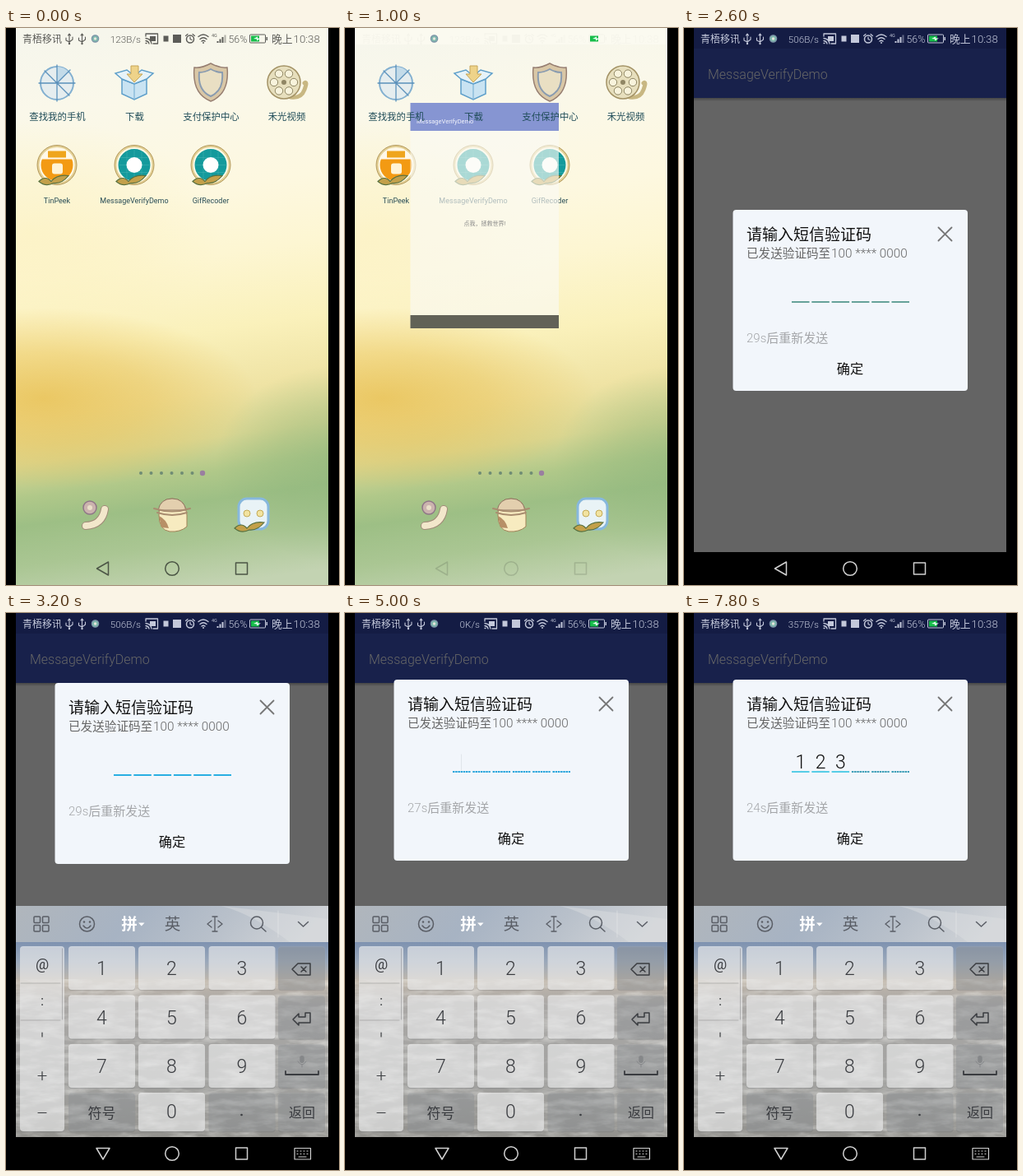
These frames come from a looping animation (405x677 px, 8 s). An HTML page:

```html
<!DOCTYPE html>
<html lang="zh-CN">
<head>
<meta charset="utf-8">
<title>MessageVerifyDemo</title>
<style>
html, body { margin: 0; width: 100%; height: 100%; overflow: hidden; background: #000; }
svg { display: block; width: 100vw; height: 100vh; }
text { font-family: Roboto, "Noto Sans CJK SC", "Noto Sans CJK", sans-serif; white-space: pre; }
.thin { font-weight: 300; }
.line { fill: none; stroke-linecap: round; stroke-linejoin: round; }
.slot { stroke-linecap: butt; }
</style>
</head>
<body>
<svg id="stage" viewBox="0 0 405 677" preserveAspectRatio="none"></svg>
<script>
const LOOP = 8000, TICK = 200;

// Drawing helpers
const rect = (x, y, w, h, fill, r = 0, more = '') =>
  `<rect x="${x}" y="${y}" width="${w}" height="${h}" rx="${r}" fill="${fill}" ${more}/>`;
const circle = (x, y, r, fill, more = '') => `<circle cx="${x}" cy="${y}" r="${r}" fill="${fill}" ${more}/>`;
const line = (d, width = 1.5, color = 'currentColor', more = '') =>
  `<path class="line" d="${d}" stroke-width="${width}" stroke="${color}" ${more}/>`;
const shape = (d, fill, more = '') => `<path d="${d}" fill="${fill}" ${more}/>`;
const text = (x, y, s, size, fill, more = '') =>
  `<text x="${x}" y="${y}" font-size="${size}" fill="${fill}" ${more}>${s}</text>`;
const outline = (color, width = 1.5) => `stroke="${color}" stroke-width="${width}"`;
const ring = outline('currentColor');
const mid = 'text-anchor="middle"';
const thin = 'class="thin"';
const at = (x, y, body) => `<g transform="translate(${x} ${y})">${body}</g>`;
const group = (id, body, more = '') => `<g id="${id}" ${more}>${body}</g>`;
const stops = list => list.map(([o, c, a = 1]) => `<stop offset="${o}" stop-color="${c}" stop-opacity="${a}"/>`).join('');
const glow = (id, x, y, rx, ry, color, alpha) =>
  `<radialGradient id="${id}" gradientUnits="userSpaceOnUse" r="1" gradientTransform="translate(${x} ${y}) scale(${rx} ${ry})" cx="0" cy="0">${stops([[0, color, alpha], [.5, color, alpha * .6], [1, color, 0]])}</radialGradient>`;

const defs = `<defs>
  <linearGradient id="wall" gradientUnits="userSpaceOnUse" x1="155" y1="0" x2="250" y2="677">${stops([
    [0, '#f6f6ec'], [.12, '#faf8ea'], [.3, '#fdf8e0'], [.42, '#fdf6d2'], [.55, '#faf1bb'], [.66, '#efe3a4'],
    [.74, '#d9d794'], [.8, '#b0c889'], [.85, '#9dbf85'], [.92, '#aac693'], [1, '#c3d3b2']])}</linearGradient>
  ${glow('sun', 45, 450, 260, 110, '#e8bd4c', .75)}${glow('grass', 405, 530, 150, 120, '#8fb67c', .6)}
  ${glow('haze1', 30, 250, 230, 140, '#fbefb4', .5)}
  <linearGradient id="sky" x1="0" y1="0" x2="0" y2="1">${stops([
    [0, '#7e92b0'], [.1, '#9aa8ba'], [.2, '#c0b7ab'], [.32, '#a9a7a5'], [.7, '#a3a3a1'], [1, '#92918d']])}</linearGradient>
  <linearGradient id="band" x1="0" y1="0" x2="1" y2=".1">${stops([
    [0, '#b0b6bc'], [.4, '#a7b3c3'], [.7, '#b8c0ca'], [1, '#d0d3d7']])}</linearGradient>
  <linearGradient id="shade" x1="0" y1="0" x2="0" y2="1">${stops([[0, '#000', .3], [1, '#000', 0]])}</linearGradient>
  <filter id="clouds" x="0" y="0" width="1" height="1">
    <feTurbulence type="fractalNoise" baseFrequency=".03 .11" numOctaves="4" seed="4"/>
    <feColorMatrix values="0 0 0 0 1  0 0 0 0 1  0 0 0 0 .97  2.4 0 0 0 -.95"/>
  </filter>
</defs>`;

// Home screen icons, each centred on 0,0
const leaves = shape('M-22 20Q-14 12-7 20Q0 11 14 13Q6 23-4 22Q-14 27-22 20Z', '#c3a04a', outline('#58703f', 1.2));
const badge = (fill, inner) => circle(0, 0, 24, '#e3cf94', outline('#b3995c', 1)) +
  circle(0, 0, 20.5, fill, outline('#fffbe8', 2)) + inner + leaves;
const grid = line('M-16-9H16M-18 0H18M-16 9H16M-9-16V16M0-18V18M9-16V16', .6, '#4fb9b9', 'opacity=".7"');
const icons = {
  finder: circle(0, 1, 20, '#e5edef', outline('#83b0d0', 2)) + shape('M0 1V-19A20 20 0 0 1 14-13Z', '#c3dbe9') +
    line('M-22 1H22M0-21V23M-15-14L15 16M0 1L16-15', 1.3, '#5b91bb'),
  box: shape('M-15-4L0 2 15-4V14L0 21-15 14Z', '#c9e3f2', outline('#5e9fca')) +
    shape('M-15-4L-23-11-9-15 0-8 9-15 23-11 15-4 0 2Z', '#e7f3f8', outline('#5e9fca')) +
    line('M0 2V21', 1.2, '#7db3d5') + shape('M-4-20H5V-10H10L0 0-9-10H-4Z', '#eed38a', outline('#c6a559', 1)),
  shield: shape('M-20-18Q-11-17 0-23Q11-17 20-18Q23 14 0 23Q-23 14-20-18Z', '#d9c7a6', outline('#977f72')) +
    shape('M-14-12Q-7-12 0-16Q7-12 14-12Q16 10 0 17Q-16 10-14-12Z', '#e9dfc3', outline('#8a9cb0', 2)),
  reel: line('M5 18Q18 20 22 9T22 1', 5, '#c8b782') + circle(-3, 0, 20, '#e7dfbd', outline('#a39265')) +
    [0, 1, 2, 3, 4, 5].map(i => circle(-3 + 12 * Math.cos(i * 1.047), 12 * Math.sin(i * 1.047), 4.7, '#f8f3dc', outline('#8e8562', 1))).join('') +
    circle(-3, 0, 3, '#908664'),
  tag: badge('#f39a13', shape('M-19-7A20 20 0 0 1 19-7Z', '#fff8e8') + rect(-11, -17, 22, 8, '#efa51d') + rect(-6, -2, 13, 13, '#fff3d5', 3)),
  robot: badge('#149a9c', grid + circle(0, 0, 9.5, '#fff')),
  phone: line('M-11 13Q9 12 12-7', 10, '#a08a78') + line('M-11 13Q9 12 12-7', 8, '#f2e7cb') +
    circle(-6, -9, 8, '#cbb3ae', outline('#8f7687')) + circle(-6, -9, 3, '#eadfc8'),
  cap: shape('M-16 0Q-17-20 0-20T18 0V14Q10 21-3 20Q-16 18-16 0Z', '#f7ebc0', outline('#a08157', 1)) +
    shape('M-17-6Q-14-20 0-20T17-6Z', '#e3cfae', outline('#8d7360', 1)) +
    line('M-22-8Q0-1 22-8M-18-3Q0 3 18-3', 2, '#a98d70') + shape('M-16 1Q-7 5-4 16L-13 15Z', '#b78f66'),
  chat: rect(-17, -20, 36, 37, '#e9f3f6', 10, outline('#87b8dd', 3)) +
    circle(-7, -2, 4, '#f2e3a0', outline('#c4aa57', 1)) + circle(9, -2, 4, '#f2e3a0', outline('#c4aa57', 1)) + at(0, -4, leaves)
};

const topRow = [['finder', 62, '查找我的手机'], ['box', 156, '下载'], ['shield', 249, '支付保护中心'], ['reel', 341, '禾光视频']];
const lowRow = [['tag', 62, 'TinPeek'], ['robot', 156, 'MessageVerifyDemo'], ['robot', 249, 'GifRecoder']];
const home = group('home',
  ['wall', 'haze1', 'sun', 'grass'].map(id => rect(12, 0, 380, 677, `url(#${id})`)).join('') +
  topRow.map(([icon, x]) => at(x, 66, icons[icon])).join('') +
  lowRow.map(([icon, x, name]) => at(x, 166.5, icons[icon]) + text(x, 212.5, name, 9, '#2b4f58', mid)).join('') +
  [0, 1, 2, 3, 4, 5, 6].map(i => circle(164 + i * 12.5, 541, i == 6 ? 3.2 : 2, i == 6 ? '#9a7fa0' : '#6f8c74')).join('') +
  at(108, 592, icons.phone) + at(202, 592, icons.cap) + at(300, 592, icons.chat));
const topLabels = topRow.map(([, x, name]) => text(x + .5, 112, name, 11.4, '#1f4c58', mid)).join('');

const opening = group('opening',
  rect(79.5, 91, 180.5, 274, '#fbfaf4', 0, 'opacity=".65"') + rect(79.5, 91, 180.5, 34, '#6a7ccb', 0, 'opacity=".8"') +
  rect(79.5, 349, 180.5, 16, '#55564b', 0, 'opacity=".92"') +
  text(87, 116, 'MessageVerifyDemo', 7.5, '#f4f5fc') + text(170, 240, '点我，拯救世界!', 7, '#888', mid));

const app = group('app',
  rect(12, 0, 380, 677, '#fafafa') + rect(12, 85, 380, 4, 'url(#shade)') +
  rect(12, 0, 380, 25, '#3247ab') + rect(12, 25, 380, 60, '#3b52bb') +
  text(29, 62, 'MessageVerifyDemo', 16, '#fff', thin) + text(202, 367, '点我，拯救世界!', 14.6, '#666', `id="prompt" ${mid}`));

const cells = [0, 1, 2, 3, 4, 5];
const cellX = i => 131 + i * 24.3;
const dialog = group('dialog',
  rect(59.5, 221, 285.5, 220, '#f2f6fb', 4) +
  text(76, 258, '请输入短信验证码', 19, '#111') +
  text(76, 279, '已发送验证码至', 14.6, '#666', thin) + text(179, 279, '100 **** 0000', 15.3, '#666', thin) +
  line('M309.5 242.5L325.5 258.5M325.5 242.5L309.5 258.5', 1.8, '#777') +
  cells.map(i => line(`M${cellX(i)} 333H${cellX(i) + 21.5}`, 1.8, '', `id="slot${i}" style="stroke-linecap:butt"`) +
    text(cellX(i) + 10.8, 329, '', 23, '#111', `class="thin" id="digit${i}" ${mid}`)).join('') +
  group('caret', line('M141.5 312V331', 1, '#9aa5ad', 'opacity=".2"')) +
  `<text class="thin" x="76" y="382" font-size="15" fill="#a4a6a9"><tspan id="count"></tspan>后重新发送</text>` +
  text(202, 420, '确定', 16.2, '#111', mid));

// Keyboard
const columns = [76, 161, 246.5], rows = [405, 464.5, 524, 583];
const pale = 'rgba(255,255,255,.58)', dull = 'rgba(160,162,165,.38)', ink = '#3a3c40';
const key = (x, y, w, h, fill) => rect(x, y + 1.2, w, h, 'rgba(80,82,88,.18)', 4) + rect(x, y, w, h, fill, 4);
const digit = (x, y, d) => text(x, y, d, 23, ink, `class="thin" ${mid}`);
const digitKeys = [...'123456789'].map((d, i) => {
  const x = columns[i % 3], y = rows[Math.floor(i / 3)];
  return key(x, y, 81, 53, pale) + digit(x + 40.5, y + 35, d);
}).join('');
const square = (x, y) => rect(x, y, 7.5, 7.5, 'none', 1, ring);
const toolbar = '<g color="#5a5e66">' +
  square(34, 369) + square(44.5, 369) + square(34, 379.5) + square(44.5, 379.5) +
  circle(98.5, 378, 9, 'none', ring) + circle(95, 375.5, 1.2, 'currentColor') + circle(102, 375.5, 1.2, 'currentColor') +
  line('M94 380Q98.5 386 103 380') + line('M250 374L245 378 250 382M258 374L263 378 258 382M251 369H257M251 387H257M254 369V387', 1.3) +
  circle(305, 376.5, 7.5, 'none', ring) + line('M310.5 382L316 387') +
  line('M355.5 375.5L361.5 381 367.5 375.5') + line('M331 362V394', .6, '#fff', 'opacity=".5"') + '</g>' +
  text(150, 385, '拼', 19.5, '#fff', `${mid} font-weight="700"`) + shape('M161 376.5H168.5L164.8 380.5Z', '#fff') +
  text(202.5, 385, '英', 19.5, '#5a5e66', mid);
const keyboard = group('keyboard',
  rect(12, 356, 380, 44, 'url(#band)') + shape('M262 356L392 372V400H345Q300 366 262 356Z', '#dcdedf', 'opacity=".45"') +
  rect(12, 400, 380, 237, 'url(#sky)') + rect(12, 445, 380, 192, '#fff', 0, 'filter="url(#clouds)" opacity=".4"') +
  key(17, 405, 54, 225, pale) + digitKeys +
  key(76, 583, 81, 47, dull) + key(161, 583, 81, 47, pale) + key(246.5, 583, 81, 47, dull) +
  rows.map((y, i) => key(331, y, 57, i == 3 ? 47 : 53, dull)).join('') +
  text(116.5, 614, '符号', 17, ink, mid) + digit(201.5, 614, '0') +
  circle(286.5, 610, 1.3, ink) + text(360, 613, '返回', 16, ink, mid) +
  text(44, 433, '@', 18, ink, mid) + text(44, 477, ':', 17, ink, mid) +
  `<g color="${ink}">` + line('M44 510V515M39 562.5H49M44 557.5V567.5M39 607.5H49', 1.2) +
  line('M68.5 408V494M18 450H66M18 495H66', .7, 'currentColor', 'opacity=".35"') +
  line('M348 433L355 426H370V440H355ZM359 430L365 436M365 430L359 436') +
  line('M349 494L356 487V491H364V486H370V498H356V501Z') + line('M340 557V561H380V557', 1.8) + '</g>' +
  rect(357.3, 538, 5.4, 9, '#858789', 2.7) + line('M355 545Q360 553 365 545M360 549V552', 1, '#858789') + toolbar);

const nav = group('navBack', rect(12, 637, 380, 40, '#000')) + group('nav',
  group('back', line('M110.5 657L124.5 649V665Z')) + group('hide', line('M110 650.5H126L118 664Z')) +
  circle(202, 657, 8.3, 'none', ring) + line('M279.5 650H293.5V664H279.5Z') +
  group('kbdIcon', line('M351 650.5H370.5V664H351ZM354 654H355M358 654H359M362 654H363M366 654H367M354 657.5H355M358 657.5H359M362 657.5H363M366 657.5H367M356 661H365', 1.2)));

const usb = line('M0-5V6M-4-1V2L0 4 4 1V-2M-1.5-4L0-6 1.5-4', 1.1) + circle(0, 6, 1.2, 'currentColor');
const label = (x, s, size, more = thin) => text(x, 17.5, s, size, 'currentColor', more);
const status = group('status',
  label(20, '青梧移讯', 12) + at(77, 13, usb) + at(92.5, 13, usb) +
  label(164, '', 11.7, 'class="thin" id="speed" text-anchor="end"') +
  line('M170 10V7H184.5V19H179M170 18.5H171M170 15.5Q173.5 16 174 19M170 12.5Q176 13 177 19', 1.3) + rect(175, 10, 7, 6, 'currentColor') +
  rect(191.5, 9.5, 6, 7, 'currentColor') + rect(203, 8, 10, 10, 'currentColor') +
  circle(224, 13.5, 4.5, 'none', ring) + line('M224 11V13.5L226 14.5M218.5 9.5L221 7.5M229.5 9.5L227 7.5', 1.2) +
  line('M234 10.5Q240 5.5 246 10.5M236 13.5Q240 10 244 13.5M238 16Q240 14.5 242 16', 1.4) + circle(240, 18, 1, 'currentColor') +
  text(250, 11, '4G', 5.5, 'currentColor') +
  [0, 1, 2, 3].map(i => rect(256.5 + i * 3, 16 - i * 2.5, 2, 2 + i * 2.5, 'currentColor', 0, i == 3 ? 'opacity=".45"' : '')).join('') +
  label(270.5, '56%', 12.4) + rect(296.5, 8, 19, 10, 'none', 1, outline('currentColor', 1)) + rect(316.5, 11, 1.5, 4, 'currentColor') +
  label(323, '晚上', 12.8) + label(349.5, '10:38', 13.3));
const steady = circle(108.5, 13, 4.2, '#7fb8ad', outline('#7c92a8', 1.2)) + circle(108.5, 13, 1.7, '#e6e6dc') +
  rect(298, 9.5, 10, 7, '#18bd4b') + shape('M301 13L306 10.5V12.5H310L305 15.5V13.5Z', '#e5fff0');

const $ = id => document.getElementById(id);
$('stage').innerHTML = defs + home + opening + topLabels + group('haze', rect(12, 0, 380, 20, '#fbfaf0')) + app +
  group('dim', rect(12, 0, 380, 637, '#000')) + dialog + keyboard + nav + status + steady +
  rect(0, 0, 12, 677, '#000') + rect(392, 0, 13, 677, '#000');

// Steps: [start in ms, value]
const speeds = [[0, '123B/s'], [1800, '506B/s'], [4400, '0K/s'], [7400, '357B/s']];
const dialogFade = [[0, 0], [2400, .5], [2600, 1]];
const dialogShift = [[0, 0], [3000, -60], [3200, -136], [3400, -140]];
const boardShift = [[0, 281], [3000, 140], [3200, 0]];
const typed = [[0, ''], [6000, '1'], [6600, '12'], [7400, '123']];
const openScale = [[0, 0], [800, .6], [1000, 1], [1800, 0]];
const counts = [[0, 29], [3400, 28], [4400, 27], [5400, 26], [6400, 25], [7400, 24]];
const pick = (steps, t) => steps.filter(([start]) => start <= t).pop()[1];

const show = (id, on) => $(id).setAttribute('visibility', on ? 'visible' : 'hidden');
const fade = (id, value) => $(id).setAttribute('opacity', value);
const slide = (id, y) => $(id).setAttribute('transform', `translate(0 ${y})`);

function slotStyle(i, t, code) {
  if (i < code.length) return ['#45c9e6', 'none'];
  if (t < 3000) return ['#56998f', 'none'];
  if (t < 4200) return ['#12a8e0', 'none'];
  return [t < 6000 ? '#2ba6dc' : '#3f9fb8', '2.5 .7'];
}

function draw(t) {
  const inApp = t >= 1800, boardUp = t >= 3000, code = pick(typed, t), scale = pick(openScale, t);
  const launching = t >= 1000 && !inApp;
  show('app', inApp);
  show('prompt', inApp && !boardUp);
  show('navBack', inApp);
  show('haze', launching);
  show('opening', scale > 0);
  fade('opening', scale < 1 ? .5 : 1);
  $('opening').setAttribute('transform', `translate(156 166) scale(${scale}) translate(-156 -166)`);

  const shown = pick(dialogFade, t);
  fade('dim', .6 * shown);
  fade('dialog', shown);
  slide('dialog', pick(dialogShift, t));
  show('keyboard', boardUp);
  slide('keyboard', pick(boardShift, t));
  show('back', !boardUp);
  show('hide', boardUp);
  show('kbdIcon', boardUp);
  show('caret', t >= 4200 && t < 5400);

  for (const i of cells) {
    const [color, dash] = slotStyle(i, t, code);
    $('slot' + i).style.stroke = color;
    $('slot' + i).style.strokeDasharray = dash;
    $('digit' + i).textContent = code[i] || '';
  }
  $('count').textContent = pick(counts, t) + 's';
  $('speed').textContent = pick(speeds, t);
  $('status').setAttribute('color', inApp ? '#c3c8da' : '#5c5c58');
  fade('status', launching ? .03 : 1);
  $('nav').setAttribute('color', inApp ? '#d0d0d0' : '#4c5646');
  fade('nav', launching ? .22 : 1);
}

let last = -1;
const origin = performance.now();
function loop() {
  const t = Math.floor((performance.now() - origin) % LOOP / TICK) * TICK;
  if (t !== last) draw(last = t);
  requestAnimationFrame(loop);
}
loop();
</script>
</body>
</html>
```
